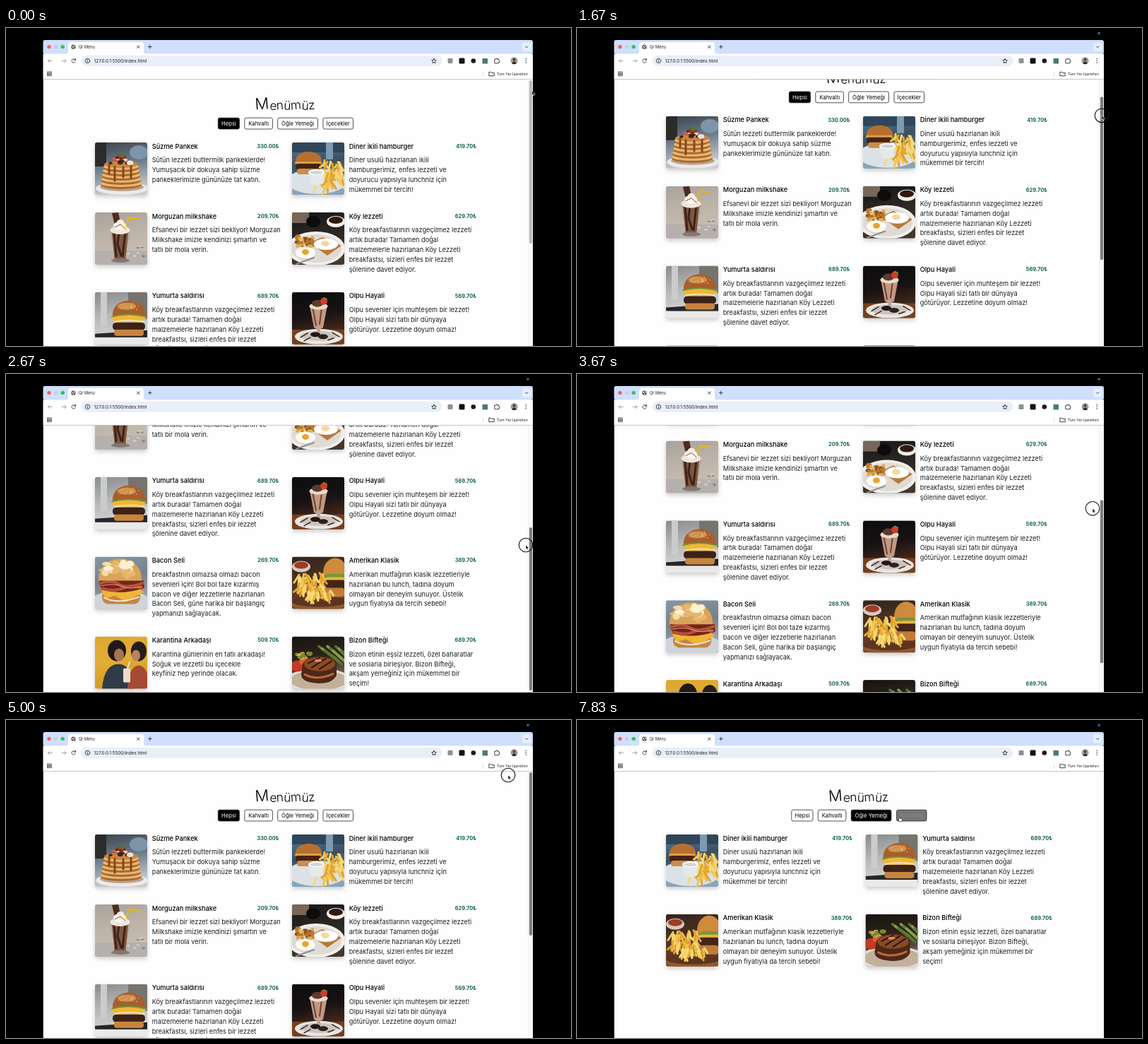
An HTML page for the animation above (8 s loop, 800x450 px).

```html
<!DOCTYPE html>
<html lang="tr">
<head>
<meta charset="utf-8">
<title>Qr Menu</title>
<style>
  html, body { margin: 0; width: 100%; height: 100%; overflow: hidden; background: #000; }
  svg { display: block; width: 100vw; height: 100vh; font-family: Inter, "Open Sans", sans-serif; }
  .name { font-size: 9.25px; font-weight: 500; }
  .desc { font-size: 9.2px; fill: #1c1e20; }
  .price { font-size: 7.4px; font-weight: 700; fill: #14693f; text-anchor: end; }
  .btn { font-size: 7.7px; text-anchor: middle; }
  .head { font-size: 17.3px; font-weight: 300; text-anchor: middle; }
  .tile { filter: drop-shadow(0 3px 3px rgba(0, 0, 0, .2)); }
  .icon { fill: none; stroke: #3c4043; stroke-width: 1; stroke-linecap: round; stroke-linejoin: round; }
</style>
</head>
<body>
<svg id="stage" viewBox="0 0 800 450" preserveAspectRatio="xMidYMid meet"></svg>
<script>
const LOOP = 8000, STEP = 1000 / 6;
const TOP = 162, LINE = 13.8, MAX_SCROLL = 228;

// Shape helpers
const rect = (x, y, w, h, fill, r = 0, more = '') =>
  `<rect x="${x}" y="${y}" width="${w}" height="${h}" rx="${r}" fill="${fill}" ${more}/>`;
const oval = (x, y, rx, ry, fill, more = '') =>
  `<ellipse cx="${x}" cy="${y}" rx="${rx}" ry="${ry}" fill="${fill}" ${more}/>`;
const shape = (d, fill) => `<path d="${d}" fill="${fill}"/>`;
const line = (d, color, w = 1) =>
  `<path d="${d}" fill="none" stroke="${color}" stroke-width="${w}" stroke-linecap="round"/>`;
const icon = d => `<path class="icon" d="${d}"/>`;
const text = (x, y, cls, s, more = '') => `<text x="${x}" y="${y}" class="${cls}" ${more}>${s}</text>`;

let seed = 7;
const rnd = () => (seed = (seed * 16807) % 2147483647) / 2147483647;
const scatter = (n, fn) => Array.from({ length: n }, fn).join('');

let gradients = '';
function back(a, b, c) {
  const id = 'g' + gradients.length;
  gradients += `<linearGradient id="${id}" x2=".2" y2="1"><stop stop-color="${a}"/>` +
    `<stop offset=".5" stop-color="${b}"/><stop offset="1" stop-color="${c}"/></linearGradient>`;
  return rect(0, 0, 74, 74, `url(#${id})`);
}
function fries(x, y, w, h, n) {
  return scatter(n, () => {
    const a = x + rnd() * w, b = y + rnd() * h, dx = rnd() * 18 - 9;
    const tone = ['#f3c551', '#e2a432', '#f8d976'][Math.floor(rnd() * 3)];
    return line(`M${a} ${b}l${dx} ${6 + rnd() * 9}`, tone, 3);
  });
}
const crumbs = (x, y, w, h, n, tones, r) => scatter(n, () =>
  oval(x + rnd() * w, y + rnd() * h, r * (.5 + rnd()), r * (.4 + rnd() * .6), tones[Math.floor(rnd() * tones.length)]));
const bun = (x, y, w, h, fill) =>
  shape(`M${x} ${y + h}C${x - 2} ${y - h / 3} ${x + w + 2} ${y - h / 3} ${x + w} ${y + h}Z`, fill);

const arts = {
  pancake: () => back('#39434c', '#6d7c8b', '#c9ccd0') + rect(0, 0, 16, 34, '#2c2b2c') +
    oval(62, 14, 13, 10, '#7e95a9') + oval(38, 65, 37, 9, '#eceae8') + oval(38, 63, 31, 6, '#b8a292') +
    [60, 54, 48, 42, 36].map((y, i) => oval(37, y, 29 - i, 6, '#a9692c') + oval(37, y - 2, 29 - i, 5, '#e8b674')).join('') +
    oval(37, 31, 24, 5, '#c98640') + line('M20 32v12M28 34v20M40 35v14M51 33v17', '#8a451b', 3) +
    crumbs(22, 19, 30, 11, 20, ['#a32c22', '#d75b3b', '#44231c', '#efe0cf'], 3.4) + oval(38, 18, 4, 3, '#55752f'),
  diner: () => back('#517b9b', '#3c4f5e', '#87a2b5') + rect(0, 0, 74, 14, '#30465a') + rect(48, 0, 10, 24, '#7b9ab4') +
    oval(33, 60, 46, 20, '#86a5bb') + oval(35, 55, 42, 18, '#dbe2e6') + bun(5, 13, 37, 15, '#b66f30') +
    rect(4, 27, 38, 4, '#d8a145', 2) + rect(5, 30, 36, 8, '#452317', 3) + rect(7, 37, 33, 8, '#c88e4b', 4) +
    fries(46, 25, 24, 27, 40) + fries(30, 54, 28, 5, 9) +
    shape('M23 42h23l-3 16q-8 4-17 0z', '#e6e9ea') + oval(34.5, 42, 11.5, 4, '#fff') + oval(34.5, 42.5, 9, 2.6, '#cfd4d5'),
  shake: () => back('#a9a29b', '#bdb3a9', '#c9bfb5') + rect(0, 54, 74, 20, '#b5b0ad') +
    crumbs(46, 46, 24, 18, 8, ['#8c8178', '#d5cdc5'], 2) + shape('M24 1l9-1 4 19-8 3z', '#4b2c1d') +
    line('M44 21L48 7l13 2', '#e2b81e', 2.4) + shape('M22 25h27l-5 42q-8 4-17 0z', '#7d5741') +
    line('M27 28l3 34M34 28l-2 17 5 16M43 27l-4 35', '#3d2218', 3) + line('M23 27l4 38M48 27l-4 38', '#d7c3b2', 1) +
    oval(35.5, 25, 14, 6, '#efe6dc') + oval(35, 19, 9, 6, '#fff8f0') + oval(36, 14, 5, 4, '#f8eee2') +
    line('M28 21l8-4 7 6', '#7a4b31') + oval(36, 68, 13, 3, '#817870'),
  country: () => back('#171718', '#2b2724', '#43372e') + rect(0, 0, 24, 15, '#776659') + oval(62, 13, 13, 8, '#f1eee8') +
    oval(62, 11, 10, 5, '#30190f') + oval(30, 13, 10, 8, '#0c0c0d') + oval(34, 51, 41, 24, '#f2efeb') +
    oval(34, 51, 36, 20, '#dfdad4') + crumbs(7, 34, 26, 14, 44, ['#b8772d', '#e0ac4e', '#8b511e'], 3) +
    shape('M25 43l18-8 27 12-20 14z', '#b77b3a') + oval(48, 45, 17, 8, '#fff') + oval(47, 44, 6, 4, '#f3d9a0') +
    oval(19, 57, 14, 8, '#fbfaf6') + oval(19, 56, 5, 4, '#e6a52e') + line('M6 73L31 64', '#8f8d8b', 2),
  egg: () => back('#888b8d', '#b9b9b8', '#d9d9d7') + rect(47, 0, 27, 38, '#77736e') + rect(8, 0, 9, 48, '#c9cbcc') +
    shape('M0 59L74 54V68L0 64Z', '#23272b') + rect(0, 64, 74, 10, '#e9e9e8') + bun(25, 12, 46, 22, '#a85f2b') +
    oval(45, 20, 13, 5, '#d1924f') + crumbs(32, 15, 30, 10, 16, ['#f2d8a7'], .8) + oval(48, 35, 25, 4, '#6d913d') +
    shape('M22 36q25-7 51 0l-9 6-7 6-8-7-15 4z', '#f1b733') + rect(25, 43, 46, 11, '#3c2219', 5) +
    line('M28 42q20-4 41 0', '#eee2bb', 2) + rect(27, 53, 42, 9, '#c8843e', 4),
  cookie: () => back('#0c0c0e', '#171214', '#55301c') + rect(0, 53, 74, 21, '#75401f') + oval(38, 63, 34, 11, '#e9e5e1') +
    oval(38, 62, 26, 7, '#cbc3bd') + line('M12 64l10-6M17 69l9-5M57 57l10 6M51 68l8-3', '#3d2219', 1.5) +
    shape('M25 19h25l-6 31q-6 5-13 0z', '#c19983') + line('M29 21l5 26M42 22l-3 23', '#6d4130', 2) +
    rect(35, 49, 5, 9, '#b9a79c') + oval(37.5, 20, 13, 5, '#ead9ca') + oval(36, 16, 8, 5, '#5c3a2c') +
    oval(45, 13, 5, 5, '#d33a27') + line('M45 8l4 2', '#56903d', 2) + oval(33, 60, 7, 3.5, '#211716') + oval(44, 63, 7, 3.5, '#30211d'),
  bacon: () => back('#8796a4', '#77818a', '#a6acb2') + oval(36, 64, 43, 16, '#cfd4d8') + rect(10, 47, 54, 20, '#c78543', 9) +
    shape('M7 44l53-4 9 10-25 14-16-9-13 4z', '#f1b437') + shape('M6 34q28-8 63 0l1 10q-30 11-61 3z', '#70261c') +
    line('M7 38q16-6 27 1t34-2M11 45q17 5 30-1t25 1', '#bb5038', 4) + line('M9 41q18-4 29 1t29 0', '#e8a28a', 1) +
    bun(5, 3, 61, 31, '#d9a35b') + crumbs(12, 9, 46, 18, 22, ['#f3dba7', '#fff0cf', '#e6b66e'], 6) + line('M13 58q20 10 49-1', '#eee6d9', 2),
  classic: () => back('#33241c', '#4b3324', '#6b4225') + oval(13, 14, 13, 8, '#d5cac0') + oval(13, 12, 10, 5, '#a03c22') +
    oval(38, 66, 41, 11, '#90582d') + oval(38, 63, 39, 8, '#5c3520') + bun(44, 2, 34, 25, '#cf8a3b') +
    oval(62, 27, 17, 3, '#759641') + rect(46, 29, 32, 5, '#f0b43a', 2) + rect(46, 33, 30, 12, '#44251a', 4) +
    rect(45, 44, 30, 13, '#c27c36', 5) + fries(9, 23, 37, 30, 70) + fries(22, 47, 36, 5, 14),
  buddy: () => back('#dca730', '#e3ae36', '#d39a25') + oval(31, 20, 13, 15, '#201918') + oval(62, 21, 11, 14, '#261c1a') +
    oval(34, 26, 7, 9, '#a97453') + oval(58, 27, 6, 8, '#b98360') + shape('M10 74q3-35 23-35t23 35z', '#303a48') +
    shape('M46 74q2-33 16-33t15 33z', '#a54a35') + rect(40, 45, 10, 20, '#eadcc8', 2) + line('M46 45l3-9', '#f6f2eb', 1.5),
  steak: () => back('#171310', '#2f251c', '#807364') + oval(38, 63, 47, 18, '#e6ded4') + oval(38, 62, 41, 14, '#c2b09b') +
    scatter(9, (_, i) => line(`M${38 + i * 4} ${14 + (i % 3) * 3}l24 ${17 + i}`, i % 2 ? '#87a044' : '#567630', 3.5)) +
    oval(8, 42, 10, 8, '#c43a22') + oval(18, 35, 8, 6, '#dc6032') + crumbs(2, 23, 24, 8, 14, ['#dca941', '#748b35'], 3) +
    shape('M15 39q7-12 27-11t21 13v14q-7 13-29 11t-21-13z', '#4e2817') + oval(39, 39, 22, 10, '#8a4a27') +
    line('M23 38l16-8M28 44l20-13M39 46l17-11', '#2e150d', 2) + line('M18 54q18 9 40-1', '#bd673f', 3) + oval(37, 34, 5, 2, '#d7904d')
};

const village = ['Köy breakfastlarının vazgeçilmez lezzeti', 'artık burada! Tamamen doğal',
  'malzemelerle hazırlanan Köy Lezzeti', 'breakfastsı, sizleri enfes bir lezzet', 'şölenine davet ediyor.'];
const item = (art, kind, name, price, ...lines) => ({ art, kind, name, price, lines });
const menu = [
  item('pancake', 1, 'Süzme Pankek', '330.00', 'Sütün lezzeti buttermilk pankeklerde!',
    'Yumuşacık bir dokuya sahip süzme', 'pankeklerimizle gününüze tat katın.'),
  item('diner', 2, 'Diner ikili hamburger', '419.70', 'Diner usulü hazırlanan ikili',
    'hamburgerimiz, enfes lezzeti ve', 'doyurucu yapısıyla lunchniz için', 'mükemmel bir tercih!'),
  item('shake', 3, 'Morguzan milkshake', '209.70', 'Efsanevi bir lezzet sizi bekliyor! Morguzan',
    'Milkshake imizle kendinizi şımartın ve', 'tatlı bir mola verin.'),
  item('country', 1, 'Köy lezzeti', '629.70', ...village),
  item('egg', 12, 'Yumurta saldırısı', '689.70', ...village),
  item('cookie', 3, 'Olpu Hayali', '569.70', 'Olpu sevenler için muhteşem bir lezzet!',
    'Olpu Hayali sizi tatlı bir dünyaya', 'götürüyor. Lezzetine doyum olmaz!'),
  item('bacon', 1, 'Bacon Seli', '269.70', 'breakfastnın olmazsa olmazı bacon',
    'sevenleri için! Bol bol taze kızarmış', 'bacon ve diğer lezzetlerle hazırlanan',
    'Bacon Seli, güne harika bir başlangıç', 'yapmanızı sağlayacak.'),
  item('classic', 2, 'Amerikan Klasik', '389.70', 'Amerikan mutfağının klasik lezzetleriyle',
    'hazırlanan bu lunch, tadına doyum', 'olmayan bir deneyim sunuyor. Üstelik', 'uygun fiyatıyla da tercih sebebi!'),
  item('buddy', 3, 'Karantina Arkadaşı', '509.70', 'Karantina günlerinin en tatlı arkadaşı!',
    'Soğuk ve lezzetli bu içecekle', 'keyfiniz hep yerinde olacak.'),
  item('steak', 2, 'Bizon Bifteği', '689.70', 'Bizon etinin eşsiz lezzeti, özel baharatlar',
    've soslarla birleşiyor. Bizon Bifteği,', 'akşam yemeğiniz için mükemmel bir', 'seçim!')
];

function card(it, x, y, right) {
  return `<g class="tile"><use href="#${it.art}" x="${x}" y="${y}"/></g>` +
    text(x + 80.7, y + 8.6, 'name', it.name) + text(right, y + 7.8, 'price', it.price + '₺') +
    it.lines.map((s, i) => text(x + 80.7, y + 28.3 + i * LINE, 'desc', s)).join('');
}

// Two columns; without the scrollbar each is 3.5 wider
function cards(kind) {
  const list = menu.filter(it => !kind || String(it.kind).includes(kind));
  const grow = kind ? 3.5 : 0;
  let y = TOP, out = '';
  for (let i = 0; i < list.length; i += 2) {
    const pair = list.slice(i, i + 2);
    pair.forEach((it, c) => {
      out += card(it, c ? 405 + grow : 126, y, c ? 666 + grow * 2 : 386.5 + grow);
    });
    y += 99 + (pair.some(it => it.lines.length > 4) ? LINE : 0);
  }
  return `<g id="list${kind}">${out}</g>`;
}

const buttons = [['Hepsi', 300.3, 30.2], ['Kahvaltı', 337.8, 39.6], ['Öğle Yemeği', 384.7, 56.7], ['İçecekler', 449, 42.5]];
const header = `<g id="header">
  <text x="395.5" y="115.5" class="head" rotate="-4 5 -3 3 -4 4 -5"><tspan font-size="22">M</tspan>enümüz</text>` +
  buttons.map(([s, x, w], i) => `<g id="btn${i}">` +
    rect(x, 127.2, w, 15.8, '#fff', 2.2, 'stroke="#212529" stroke-width=".8"') +
    text(x + w / 2, 137.9, 'btn', s) + '</g>').join('') + '</g>';

const chrome = rect(52.5, 17, 693.5, 20, '#cfdffc', 3) +
  oval(61, 26.6, 2.7, 2.7, '#fb5f55') + oval(70.6, 26.6, 2.7, 2.7, '#c8cfdd') + oval(80.2, 26.6, 2.7, 2.7, '#35c24a') +
  shape('M84 37q4 0 4-4v-9q0-4 4-4h99q4 0 4 4v9q0 4 4 4z', '#fff') +
  oval(95.5, 26.8, 3.3, 3.3, '#555a60') + line('M93.2 26l2 .8 .6 2M96 24.5l1 1.4 1.4.2', '#fff', 1) +
  text(103, 28.8, '', 'Qr Menu', 'font-size="5.6" fill="#1f1f1f"') +
  icon('M185.6 25l3.4 3.4M189 25l-3.4 3.4M201.5 26.6h4.6M203.8 24.3v4.6') +
  rect(731, 20.5, 12.5, 12.5, '#e7effd', 3.5) + icon('M735.4 26l1.8 1.8 1.8-1.8') +
  rect(52.5, 36.5, 693.5, 36, '#fff') + rect(106.5, 38.8, 511, 15.2, '#e9eff9', 7.6) +
  '<g opacity=".45">' + icon('M65.5 46.5h-6M62 44l-2.5 2.5 2.5 2.5M79 46.5h6M82.5 44l2.5 2.5-2.5 2.5') + '</g>' +
  icon('M98 45a2.7 2.7 0 1 0 .2 2.6M98.4 43.4v1.9h-1.9M115.5 46.3v1.6M115.5 44.7v.1') +
  '<circle class="icon" cx="115.5" cy="46.4" r="3.2" stroke-width=".8"/>' +
  text(124.7, 48.7, '', '127.0.0.1:5500/index.html', 'font-size="6.35" fill="#1f1f1f"') +
  icon('M606 43.3l1 2.1 2.3.3-1.7 1.6.4 2.3-2-1.1-2 1.1.4-2.3-1.7-1.6 2.3-.3z') +
  rect(625.5, 43, 7, 7, '#8d9196', 1) + rect(641.5, 42.5, 8, 8, '#111', 1.5) + oval(661.8, 46.5, 3.3, 3.3, '#1b1b1d') +
  rect(674.5, 43, 7.5, 7.5, '#4d7c69', .5) +
  icon('M692.2 44.2h1.8q.3-2 1.6-1t.1 1h2.2v2q1.8.2 1 1.6t-1 .2v1.8h-5.7z') +
  oval(719.5, 46.3, 5, 5, '#a39b93') + oval(719.5, 44.8, 1.9, 2.2, '#55463e') + shape('M716 50q3.5-5 7 0-3.5 2.6-7 0z', '#2a2b2e') +
  [43.5, 46.3, 49.1].map(y => oval(736.2, y, .8, .8, '#3c4043')).join('') +
  [58.5, 62].map(x => [62, 65.4].map(y => rect(x, y, 2.3, 2.3, 'none', 0, 'stroke="#3c4043" stroke-width=".8"')).join('')).join('') +
  rect(675.5, 61.5, .7, 7, '#c3cad8') + icon('M684.2 62.4h2.5l1 1.1h3.5v4.2h-7z') +
  text(694.7, 66.7, '', 'Tüm Yer İşaretleri', 'font-size="5.35" fill="#1f1f1f"') +
  rect(52.5, 72, 693.5, .7, '#dadce0');

const tiles = Object.entries(arts).map(([id, draw]) => `<g id="${id}" clip-path="url(#tile)">${draw()}</g>`).join('');

document.getElementById('stage').innerHTML =
  `<defs>${gradients}<clipPath id="tile"><rect width="74" height="74" rx="3"/></clipPath>
  <clipPath id="view"><rect x="52.5" y="72.7" width="693.5" height="378"/></clipPath>${tiles}</defs>` +
  rect(0, 0, 800, 450, '#000') + chrome +
  `<g clip-path="url(#view)">${rect(52.5, 72.7, 693.5, 378, '#fefefe')}
  <g id="page">${header}${cards(0)}${cards(1)}${cards(2)}</g>
  <g id="bar">${rect(739, 72.7, 7, 378, '#fbfbfb')}${rect(739, 72.7, .6, 378, '#e4e4e4')}
  <rect id="thumb" x="740.9" width="4.2" height="231" rx="2.1"/></g></g>` +
  `<g id="dot">${oval(739, 7.5, 1.7, 1.8, '#3f6f9f')}${oval(741, 6.7, .8, .8, '#2c4d70')}</g>` +
  `<g id="mark">${shape('M736.8 6.3h4.4l-2.2 3.4z', '#3f7fb5')}</g>` +
  `<g id="mouse"><circle id="ring" r="9.8" fill="none" stroke="#111" stroke-width="1.1"/>
  <path id="arrow" d="M0 0v6l1.4-1.2.9 2.1 1.1-.5-.9-2h1.9z" fill="#000" stroke="#fff" stroke-width=".6"/>
  <path id="hand" d="M-.6 0q1-.7 1.3.3l.3 2 2.3.6q.9.4.7 1.4l-.5 2.4h-3.3l-2.1-2.4q-.2-1 .9-.5z" fill="#fff" stroke="#000" stroke-width=".6"/></g>`;

// time, pointer x, pointer y, scroll
const keys = [
  [0, 744.8, 89, 0], [900, 745, 97, 0], [1670, 743, 124, 37.5], [2170, 737.5, 196, 162.6],
  [2500, 736, 238, 222], [2650, 736, 242, 228], [3050, 735, 240, 228], [3670, 730, 190, 166],
  [4330, 721, 127, 63], [4830, 713, 86, 0], [5000, 711, 78, 0], [5300, 706, 77, 0],
  [6170, 368, 136, 0], [6500, 360, 137, 0], [6830, 360, 137, 0], [7170, 414, 138, 0],
  [7500, 417, 138, 0], [7833, 456.7, 137, 0]
];
const slope = (i, c) => (keys[i + 1][c] - keys[i][c]) / (keys[i + 1][0] - keys[i][0]);
function tangent(i, c) {
  if (i === 0 || i === keys.length - 1) return 0;
  const a = slope(i - 1, c), b = slope(i, c);
  return a * b <= 0 ? 0 : 2 * a * b / (a + b);
}
function track(t, c) {
  let i = 0;
  while (i < keys.length - 2 && t >= keys[i + 1][0]) i++;
  const a = keys[i], b = keys[i + 1], h = b[0] - a[0], u = Math.min(1, (t - a[0]) / h), v = 1 - u;
  return v * v * (1 + 2 * u) * a[c] + u * v * v * h * tangent(i, c) +
    u * u * (3 - 2 * u) * b[c] - u * u * v * h * tangent(i + 1, c);
}

const $ = id => document.getElementById(id);
const show = (id, on) => $(id).setAttribute('display', on ? 'inline' : 'none');
const move = (id, x, y) => $(id).setAttribute('transform', `translate(${x} ${y})`);
const ramp = (t, start) => Math.max(0, Math.min(1, (t - start) / 150));
const mix = (a, b, k) => Math.round(a + (b - a) * k);
const gray = v => `rgb(${v},${v},${v})`;

const FIRST = 6490, SECOND = 7330;
function shade(i, t) {
  if (i === 0) return t < FIRST ? 1 : 0;
  if (i === 1) return t < SECOND ? ramp(t, 6100) : 0;
  return ramp(t, i === 2 ? 7080 : 7753);
}

function render(t) {
  const x = track(t, 1), y = track(t, 2), scroll = track(t, 3);
  const kind = t < FIRST ? 0 : t < SECOND ? 1 : 2;
  const shift = kind ? 3.5 : 0;
  const drag = t > 980 && t < 5160;

  move('page', 0, -scroll);
  move('header', shift, 0);
  for (let k = 0; k < 3; k++) show('list' + k, k === kind);
  buttons.forEach((b, i) => {
    const k = shade(i, t), [box, label] = $('btn' + i).children;
    box.setAttribute('fill', gray(mix(255, 0, k)));
    label.setAttribute('fill', gray(mix(0, 255, k)));
  });

  show('bar', !kind);
  $('thumb').setAttribute('y', 74 + 143 * scroll / MAX_SCROLL);
  $('thumb').setAttribute('fill', drag ? '#7b7b7b' : '#b9b9b9');

  const over = y > 127 && y < 143 && buttons.some(b => x > b[1] + shift && x < b[1] + b[2] + shift);
  move('mouse', x, y);
  show('ring', drag || (t > 6320 && t < 6600) || (t > 7320 && t < 7480));
  show('arrow', !over);
  show('hand', over);
  show('dot', t > 980 && t < 2600);
  show('mark', t >= 2600);
}

function tick() {
  const t = performance.now() % LOOP;
  render(Math.floor((t + 4) / STEP) % 48 * STEP);
  requestAnimationFrame(tick);
}
tick();
</script>
</body>
</html>
```
